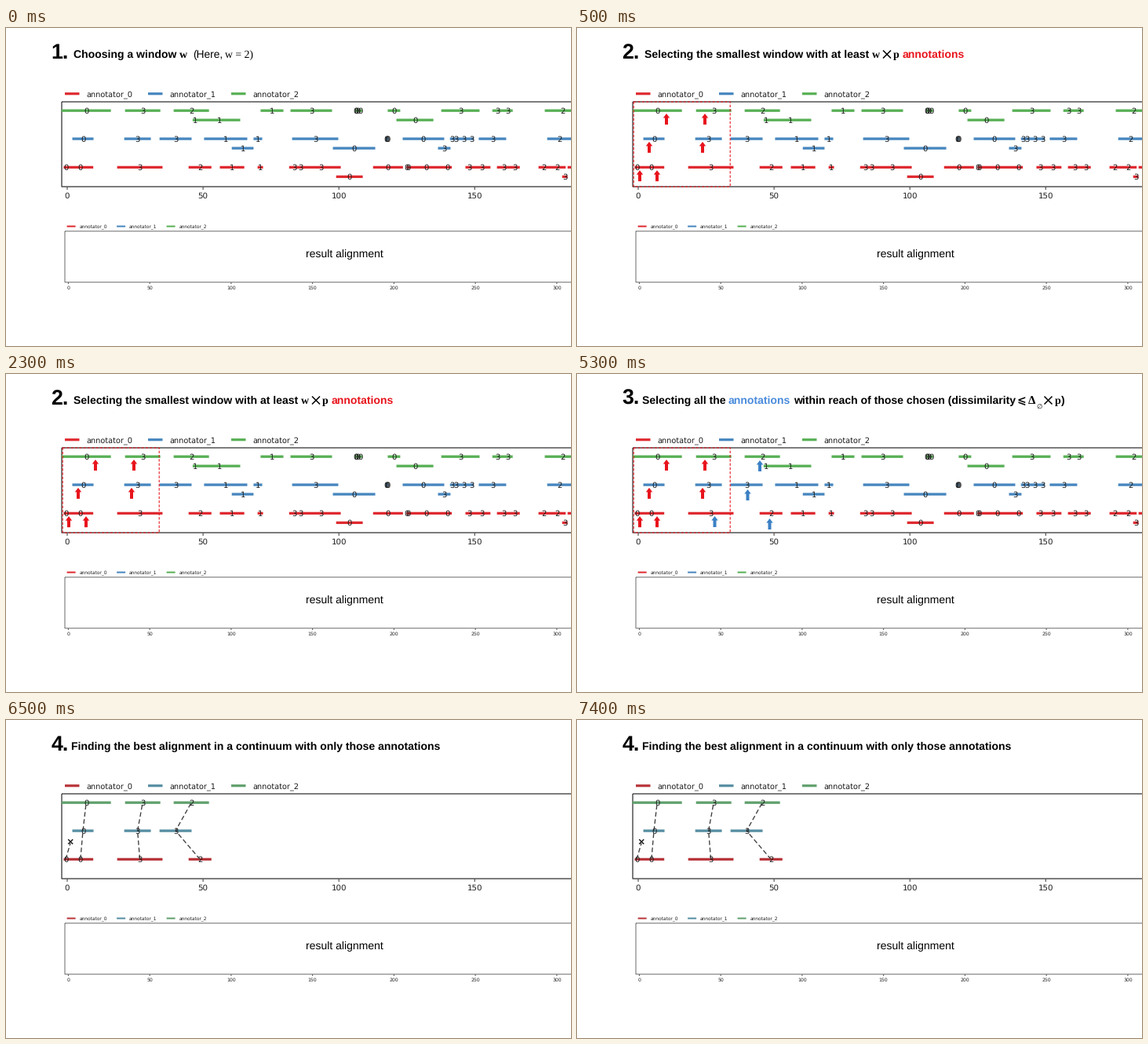
Write a matplotlib script that moves like this. It is 720 px wide and 405 px high and loops after 8 s.

```python
import matplotlib.pyplot as plt
from matplotlib.animation import FuncAnimation
from matplotlib.patches import Polygon, Rectangle

W, H, DPI = 720, 405, 100
PT = 72 / DPI  # points per pixel
STEP = 500
STARTS = (0, 500, 3500, 6500)

BRIGHT = ("#df2a30", "#4686bf", "#57b054")
MUTED = ("#b8363b", "#568ea2", "#60a06d")
TITLE_RED, TITLE_BLUE, ARROW_BLUE = "#e8141c", "#4a8bdc", "#3b80c4"
SANS, SERIF, PLOT = "Liberation Sans", "Liberation Serif", "DejaVu Sans"

# Upper plot scale: pixel position of time zero, pixels per unit, row heights
X0, UNIT = 77.6, 3.462
ROWS = (177.4, 141.1, 105.2)
LANE = 12     # drop of an annotation that overlaps the one before
REACH = 46    # annotations starting later are left out at the end

plt.rcParams["text.hinting"] = "none"
plt.rcParams["path.snap"] = False
fig = plt.figure(figsize=(W / DPI, H / DPI), dpi=DPI, facecolor="white")
ax = fig.add_axes([0, 0, 1, 1])
ax.set_xlim(0, W)
ax.set_ylim(H, 0)
ax.axis("off")

staged = []   # (artist, stages in which it shows)
tinted = []   # (line, annotator index)


def show(artist, stages):
    if stages is not None:
        staged.append((artist, stages))
    return artist


def text(x, y, s, px, font=PLOT, stages=None, color="black", bold=False, ha="left"):
    t = ax.text(x, y, s, fontsize=px * PT, family=font, color=color, ha=ha,
                va="baseline", weight="bold" if bold else "normal", zorder=5)
    return show(t, stages)


def line(xs, ys, px, color="black", stages=None, z=2, **kw):
    kw.setdefault("solid_capstyle", "butt")
    return show(ax.plot(xs, ys, lw=px * PT, color=color, zorder=z, **kw)[0], stages)


def bar(a, b, y, px, who, stages=None):
    tinted.append((line([a, b], [y, y], px, BRIGHT[who], stages), who))


def box(x, y, bottom, px, color):
    ax.add_patch(Rectangle((x, y), W, bottom - y, fill=False,
                           lw=px * PT, ec=color, zorder=1))


def ticks(x0, gap, count, y, size, base, length, color):
    for i in range(count):
        x = x0 + i * gap
        line([x, x], [y, y + length], 1, color)
        text(x, base, str(50 * i), size, ha="center", color="#222222")


def legend(x0, gap, y, length, indent, px, size, base):
    for i in range(3):
        x = x0 + i * gap
        bar(x, x + length, y, px, i)
        text(x + indent, base, f"annotator_{i}", size, color="#1a1a1a")


def cross(x, y, r, px, stages):
    for k in (-1, 1):
        line([x - r, x + r], [y - k * r, y + k * r], px, stages=stages, z=6)


def dashes(xs, ys):
    line(xs, ys, 1.3, "#3a3a3a", (3,), z=4, ls=(0, (4.5, 2.5)))


def arrow(x, tip, color, stages):
    half = [(0, 0), (4.2, 5.5), (2, 5.5), (2, 14)]
    pts = half + [(-dx, dy) for dx, dy in reversed(half)]
    show(ax.add_patch(Polygon([(x + dx, tip + dy) for dx, dy in pts],
                              fc=color, ec="none", zorder=6)), stages)


def annotate(who, runs):
    """Draw runs of back-to-back annotations; return the label centres kept to the end."""
    free, kept = -10, []
    for start, labels, *lengths in runs:
        end = start + sum(lengths)
        y = ROWS[who]
        if start < free:
            y += LANE
        else:
            free = end
        stages = None if start < REACH else (0, 1, 2)
        bar(X0 + UNIT * start, X0 + UNIT * end, y, 3.3, who, stages)
        for label, length in zip(labels, lengths):
            x = X0 + UNIT * (start + length / 2)
            text(x, y + 3.5, label, 10, stages=stages, color="#1c1c1c", ha="center")
            start += length
            if stages is None:
                kept.append(x)
    return kept


# Titles
for n in range(4):
    text(57.5, 39, f"{n + 1}.", 26.8, SANS, (n,), bold=True)


def title(n, x, s, font=SANS, color="black", bold=True, px=14):
    text(x, 38, s, px, font, (n,), color, bold)


title(0, 85.7, "Choosing a window")
title(0, 221.3, "w", SERIF)
title(0, 238.4, "(Here,", bold=False, px=13.8)
title(0, 279.2, "w = 2)", SERIF, bold=False, px=13.8)

title(1, 85.7, "Selecting the smallest window with at least")
title(1, 376, "w", SERIF)
cross(395, 33.5, 5, 1.5, (1,))
title(1, 403, "p", SERIF)
title(1, 414.7, "annotations", color=TITLE_RED)

title(2, 82.7, "Selecting all the")
title(2, 193, "annotations", color=TITLE_BLUE)
title(2, 276.2, "within reach of those chosen (dissimilarity")
title(2, 561, "\u2a7d", PLOT)
title(2, 575, "\u0394", SERIF, px=15)
text(585, 44, "\u2205", 8.5, PLOT, (2,))
cross(600.5, 33.5, 5, 1.5, (2,))
title(2, 609, "p", SERIF)
title(2, 617, ")")

title(3, 82.7, "Finding the best alignment in a continuum with only those annotations")

# Upper plot
box(71, 94, 202.1, 1.4, "#444444")
ticks(78, 173.1, 4, 202.5, 10.3, 217, 3.5, "#333333")
legend(75, 106, 83.7, 18.5, 27.3, 3.2, 9.75, 87.2)

# Lower plot
box(75, 258.8, 323.8, 1, "#6a6a6a")
ticks(79.4, 103.75, 7, 324, 6.1, 333, 2, "#555555")
legend(77.6, 63.5, 252.6, 11, 16, 2, 5.85, 254.7)
text(431.4, 292.5, "result alignment", 14, SANS, ha="center")

# Each run: start, labels, then one length per label
red = annotate(0, [
    (-1.2, "00", 1.5, 9.4), (18.5, "3", 16.7), (44.8, "2", 8.4), (56.3, "1", 9),
    (70.2, "1", 2), (81.8, "333", 4, 0.6, 14.4), (99.1, "0", 9.8), (112.7, "0", 11),
    (125, "0000", 0.2, 0.7, 12.8, 3), (146.7, "33", 3, 6.2), (158.3, "33", 4.8, 3.6),
    (173.6, "22", 4, 6), (182.3, "3", 2), (184.3, "3", 12)])
blue = annotate(1, [
    (2, "0", 7.8), (21.1, "3", 9.8), (34.1, "3", 11.8), (50.5, "1", 15.9),
    (60.7, "1", 8), (68.7, "1", 3.2), (82.9, "3", 17), (97.9, "0", 15.6),
    (117.2, "000", 0.4, 0.3, 0.4), (123.6, "0", 15.3), (136.6, "3", 4.6),
    (141, "3333", 1.6, 1.4, 4.4, 1.4), (151.6, "3", 10.1), (176.8, "2", 9.2)])
green = annotate(2, [
    (-2, "0", 18.2), (21.4, "3", 13), (39.3, "2", 13), (46.3, "11", 2, 15.5),
    (71.3, "1", 8.4), (82.3, "3", 15.3), (106.1, "0000", 0.3, 0.3, 0.6, 1.4),
    (118.1, "0", 4.6), (121.3, "0", 13.6), (137.8, "3", 14.1), (156.6, "33", 4, 3.5),
    (175.9, "2", 13)])

# Window and arrows
show(ax.add_patch(Rectangle((72.2, 94), 123, 108.2, fill=False, ec=TITLE_RED,
                            lw=1.1 * PT, ls=(0, (3, 1.8)), zorder=4)), (1, 2))
for row, pair in zip(ROWS, ((80, 102), (92, 160), (114, 163))):
    for x in pair:
        arrow(x, row + 3.8, TITLE_RED, (1, 2))
for x, tip in ((233, 110), (217.5, 147), (175.5, 181), (245.5, 184)):
    arrow(x, tip, ARROW_BLUE, (2,))

# Alignment: the first red annotation stays alone, the others form triples
for xs in zip(red[1:], blue, green):
    dashes(xs, ROWS)
dashes([red[0], 82], [ROWS[0], 157])
cross(82.2, 155, 3, 1.3, (3,))


def draw(frame):
    now = frame * STEP
    stage = sum(now >= s for s in STARTS) - 1
    for artist, stages in staged:
        artist.set_visible(stage in stages)
    palette = MUTED if stage == 3 else BRIGHT
    for seg, who in tinted:
        seg.set_color(palette[who])
    return []


anim = FuncAnimation(fig, draw, frames=16, interval=STEP, init_func=lambda: draw(0),
                     repeat=True, repeat_delay=0, blit=False)
plt.show()
```
